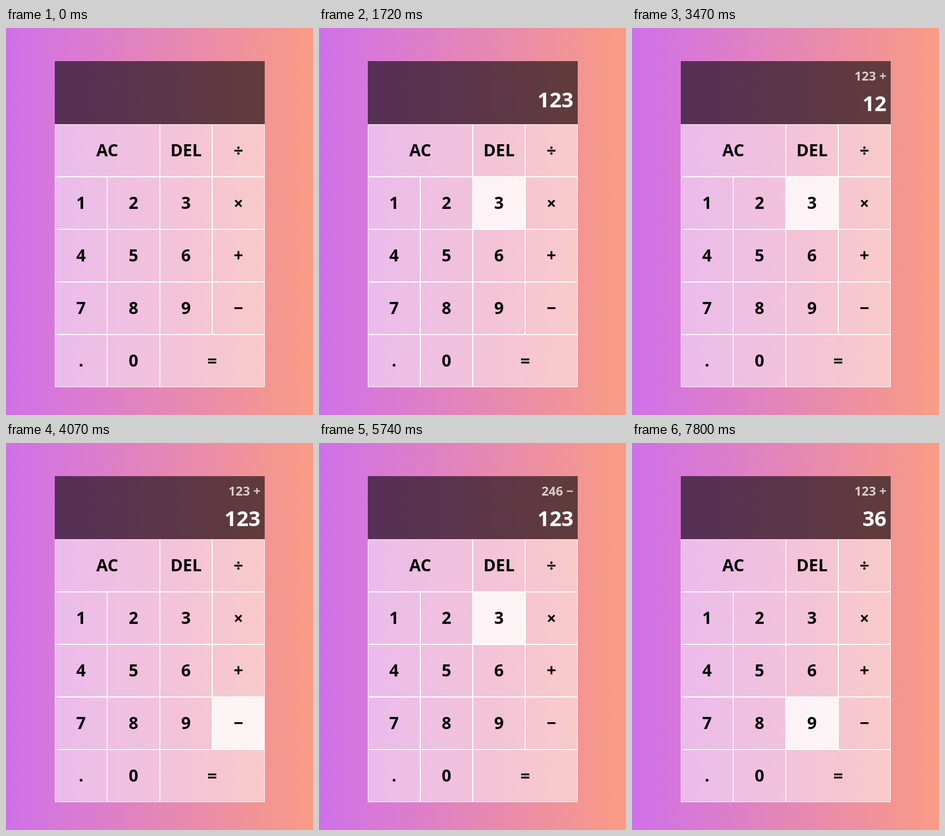
An HTML page with a canvas that plays this animation: 585 by 736 pixels, repeating every 8000 ms.

```html
<!DOCTYPE html>
<html lang="en">
<head>
<meta charset="utf-8">
<title>Calculator</title>
<style>
  html, body { margin: 0; width: 100%; height: 100%; overflow: hidden; }
  canvas { display: block; }
</style>
</head>
<body>
<canvas id="stage" width="585" height="736"></canvas>
<script>
const W = 585, H = 736, LOOP = 8000;
const LEFT = 93, TOP = 63, CELL = 100, SCREEN_H = 120;
const ctx = document.getElementById('stage').getContext('2d');

// One character per cell; a repeated character is a wide key.
const rows = ['AAD÷', '123×', '456+', '789−', '.0=='];
const labels = { A: 'AC', D: 'DEL' };
const nudge = { '÷': 1, '×': 1, '=': 1 };

// [time, key under the pointer]
const hovers = [
  [0, ''], [380, '0'], [450, '8'], [520, '4'], [590, '1'], [1050, '2'], [1450, '3'],
  [1920, '6'], [1990, '−'], [2190, '+'], [2720, '2'], [2800, '1'], [3130, '2'], [3470, '3'],
  [3930, '6'], [4000, '9'], [4070, '−'], [4660, '6'], [4730, '5'], [4800, '2'], [4870, '1'],
  [5200, '2'], [5470, '3'], [6000, '6'], [6070, '9'], [6140, '−'], [6350, '+'],
  [6950, '6'], [7150, '3'], [7410, '6'], [7800, '9']
];

// [time, key pressed]
const presses = [
  [920, '1'], [1250, '2'], [1720, '3'], [2520, '+'],
  [3070, '1'], [3400, '2'], [3670, '3'], [4400, '−'],
  [5140, '1'], [5400, '2'], [5740, '3'], [6620, '+'],
  [7350, '3'], [7670, '6']
];

const keys = rows.flatMap((row, r) =>
  [...new Set(row)].map(id => ({
    id,
    x: LEFT + row.indexOf(id) * CELL,
    y: TOP + SCREEN_H + r * CELL,
    w: (row.lastIndexOf(id) - row.indexOf(id) + 1) * CELL
  })));

const backdrop = ctx.createLinearGradient(0, 0, W, 0);
backdrop.addColorStop(0, '#d070ea');
backdrop.addColorStop(1, '#f99c84');

function box(x, y, w, h, color) {
  ctx.fillStyle = color;
  ctx.fillRect(x, y, w, h);
}

function text(str, x, y, size, color, align) {
  ctx.font = `bold ${size}px "Noto Sans", "Open Sans", sans-serif`;
  ctx.textAlign = align;
  ctx.fillStyle = color;
  ctx.fillText(str, x, y);
}

function hoveredAt(t) {
  return hovers.filter(([at]) => at <= t).pop()[1];
}

function calculate(t) {
  let total = 0, op = '', entry = '';
  for (const [at, key] of presses) {
    if (at > t) break;
    if (/\d/.test(key)) {
      entry += key;
    } else {
      total += op === '−' ? -entry : +entry;
      op = key;
      entry = '';
    }
  }
  return { previous: op && `${total} ${op}`, entry };
}

function drawScreen({ previous, entry }) {
  box(LEFT, TOP, 4 * CELL, SCREEN_H, 'rgba(0,0,0,.6)');
  const right = 485;
  text(previous, right, entry ? 100 : 112, 24, 'rgba(255,255,255,.75)', 'right');
  text(entry, right, previous ? 158 : 151, 40, '#fff', 'right');
}

function drawKey({ id, x, y, w }, hot) {
  box(x + 1, y + 1, w - 2, CELL - 2, `rgba(255,255,255,${hot ? 0.9 : 0.5})`);
  ctx.strokeStyle = '#fff';
  ctx.lineWidth = 1;
  ctx.strokeRect(x + 0.5, y + 0.5, w - 1, CELL - 1);
  text(labels[id] || id, x + w / 2, y + 61 + (nudge[id] || 0), 32, '#000', 'center');
}

function draw(t) {
  box(0, 0, W, H, backdrop);
  drawScreen(calculate(t));
  const hot = hoveredAt(t);
  keys.forEach(key => drawKey(key, key.id === hot));
}

function tick() {
  draw(performance.now() % LOOP);
  requestAnimationFrame(tick);
}
tick();
</script>
</body>
</html>
```
